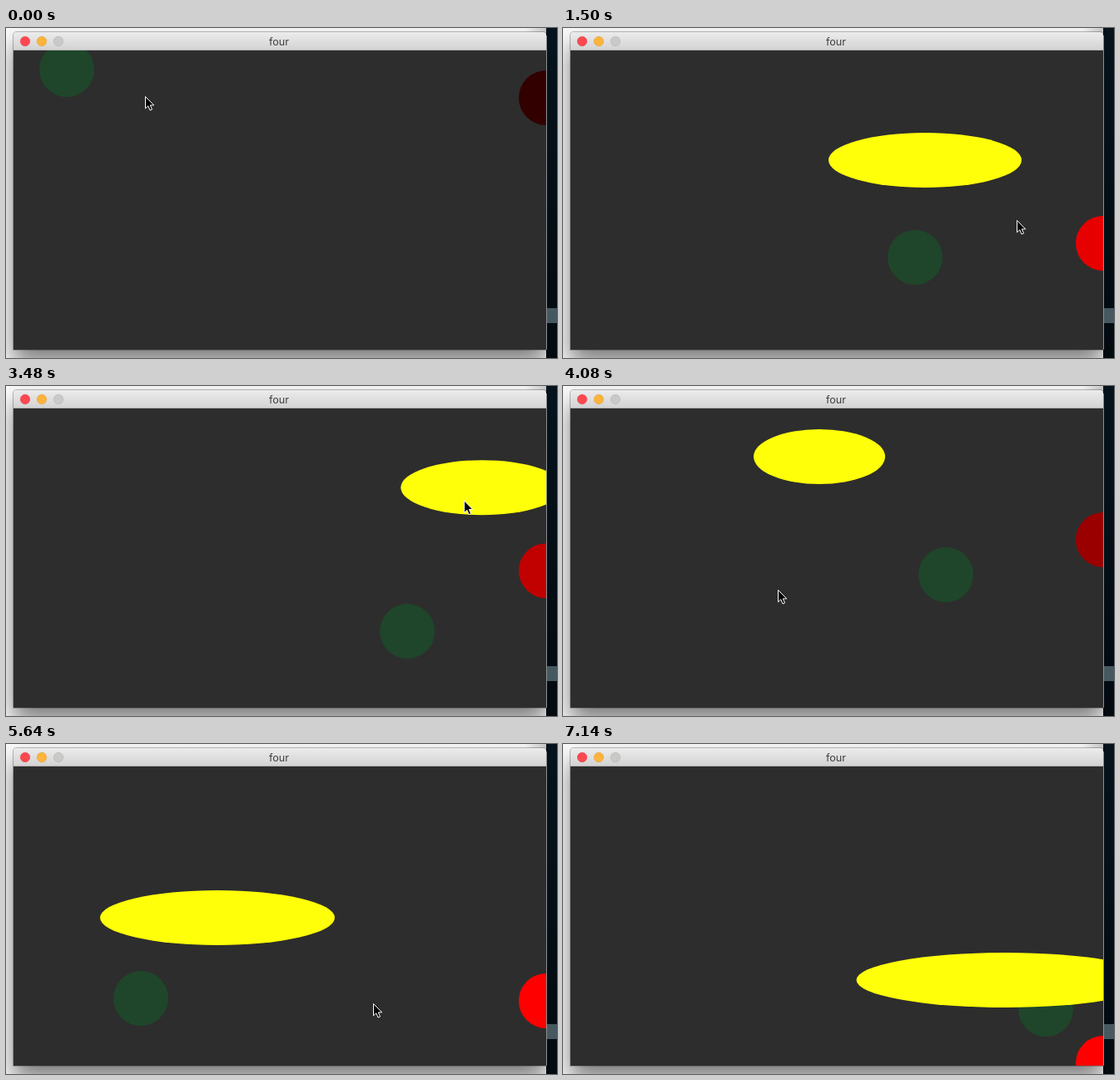
An HTML page for the animation above (7.2 s loop, 662x397 px).

```html
<!DOCTYPE html>
<html lang="en">
<head>
<meta charset="utf-8">
<title>four</title>
<style>
  html, body { margin: 0; width: 100%; height: 100%; overflow: hidden; background: #fff; }
  svg { display: block; }
  text { font: 12.5px Inter, "Open Sans", sans-serif; fill: #3f3f3f; text-anchor: middle; }
</style>
</head>
<body>
<svg width="662" height="397" viewBox="0 0 662 397">
  <defs>
    <linearGradient id="bar" x2="0" y2="1">
      <stop stop-color="#ececec"/><stop offset="1" stop-color="#d2d2d2"/>
    </linearGradient>
    <linearGradient id="desk" x2="0" y2="1">
      <stop stop-color="#06131c"/><stop offset="1" stop-color="#030a10"/>
    </linearGradient>
    <linearGradient id="shade">
      <stop stop-opacity="0"/><stop offset="1" stop-opacity=".2"/>
    </linearGradient>
    <filter id="blur" x="-20%" y="-20%" width="140%" height="140%"><feGaussianBlur stdDeviation="14"/></filter>
    <clipPath id="canvas"><rect width="640" height="360"/></clipPath>
  </defs>

  <rect width="662" height="397" fill="#fafafa"/>
  <rect x="9" y="21" width="640" height="382" opacity=".5" filter="url(#blur)"/>
  <rect x="624" width="25" height="12" fill="url(#shade)"/>
  <rect x="649" width="13" height="397" fill="url(#desk)"/>
  <rect x="650" y="337" width="12" height="18" fill="#465960"/>

  <path d="M8.5 387.5V9q0-4.5 4.5-4.5H645q4.5 0 4.5 4.5V387.5z" fill="none" stroke="#000" stroke-opacity=".25"/>
  <path d="M9 27V9q0-4 4-4H645q4 0 4 4V27z" fill="url(#bar)"/>
  <rect x="9" y="26" width="640" height="1" fill="#b4b4b4"/>
  <rect x="649" y="9" width="1" height="378" fill="#8b8f92"/>
  <circle cx="23" cy="16" r="5.7" fill="#fc4850" stroke="#e23f47" stroke-width=".6"/>
  <circle cx="43" cy="16" r="5.7" fill="#fdb43c" stroke="#e09f35" stroke-width=".6"/>
  <circle cx="63" cy="16" r="5.7" fill="#c9cac7" stroke="#b2b3b0" stroke-width=".6"/>
  <text x="328" y="20.5">four</text>

  <g transform="translate(9 27)">
    <rect width="640" height="360" fill="#2d2d2d"/>
    <g clip-path="url(#canvas)">
      <circle id="trail" r="33" fill="#1f462a"/>
      <ellipse id="wide" ry="33" fill="#ffff0a"/>
      <circle id="edge" cx="640" r="33"/>
    </g>
    <path id="cursor" d="M.5 .5V14.8L3.8 11.8L6 17L8.5 16L6.3 10.9H10.7z" fill="#000" stroke="#fff"/>
  </g>
</svg>
<script>
const STEP = 60, COUNT = 120, TURN = 2 * Math.PI;

// Key points of the pointer path: the step reached, and its last three positions.
const keys = [
  { end: 0, path: [[64, 23], [110, 57], [158, 55]] },
  { end: 25, path: [[414, 249], [426, 232], [536, 204]] },
  { end: 46, path: [[276, 155], [101, 198], [386, 335]] },
  { end: 68, path: [[451, 200], [299, 158], [249, 218]] },
  { end: 94, path: [[153, 279], [245, 282], [432, 285]] },
  { end: 109, path: [[388, 99], [430, 57], [474, 119]] },
  { end: 119, path: [[571, 292], [522, 357], [473, 422]] },
];

const $ = id => document.getElementById(id);
const clamp = (v, max) => Math.min(max, Math.max(0, v));
const mix = (a, b, u) => a + (b - a) * u;

// Circling by hand: counterclockwise, about eleven steps a turn, wider as time passes.
function circle(from, to, start, end, step) {
  const growth = Math.min(1, start / 70);
  const cx = 310, cy = mix(115, 195, growth);
  const rx = mix(200, 290, growth), ry = mix(90, 150, growth);
  const polar = ([x, y]) => {
    const dx = (x - cx) / rx, dy = (y - cy) / ry;
    return [Math.atan2(dy, dx), Math.hypot(dx, dy)];
  };
  const [a0, r0] = polar(from), [a1, r1] = polar(to);
  const u = (step - start) / (end - start);
  const turns = Math.round((end - start) / 11);
  const sweep = Math.atan2(Math.sin(a1 - a0), Math.cos(a1 - a0)) - turns * TURN;
  const angle = a0 + sweep * u;
  const radius = mix(mix(r0, r1, u), 1, Math.sin(Math.PI * u));
  return [cx + rx * radius * Math.cos(angle), cy + ry * radius * Math.sin(angle)];
}

function pointer(step) {
  const i = keys.findIndex(key => step <= key.end);
  const { end, path } = keys[i];
  const begin = end - 2;
  if (step >= begin) return path[step - begin];
  const last = keys[i - 1];
  return circle(last.path[2], path[0], last.end, begin, step);
}

function mouse(step) {
  const [x, y] = pointer(step);
  return [clamp(x, 640), clamp(y, 360)];
}

function set(id, attrs) {
  for (const name in attrs) $(id).setAttribute(name, attrs[name]);
}

// The shapes lag behind the cursor by one and two steps.
function draw(ms) {
  const step = Math.floor(ms / STEP + 1e-6) % COUNT;
  const [trailX, trailY] = mouse(step - 2);
  const [x, y] = mouse(step - 1);
  const red = clamp(Math.round(y * 1.03 - 8), 255);
  set("trail", { cx: trailX, cy: trailY });
  set("wide", { cx: x, cy: y - 100, rx: y / 2 });
  set("edge", { cy: y, fill: `rgb(${red},0,0)` });
  set("cursor", { transform: `translate(${pointer(step)})` });
}

const start = performance.now();
function tick() {
  draw(performance.now() - start);
  requestAnimationFrame(tick);
}
tick();
</script>
</body>
</html>
```
